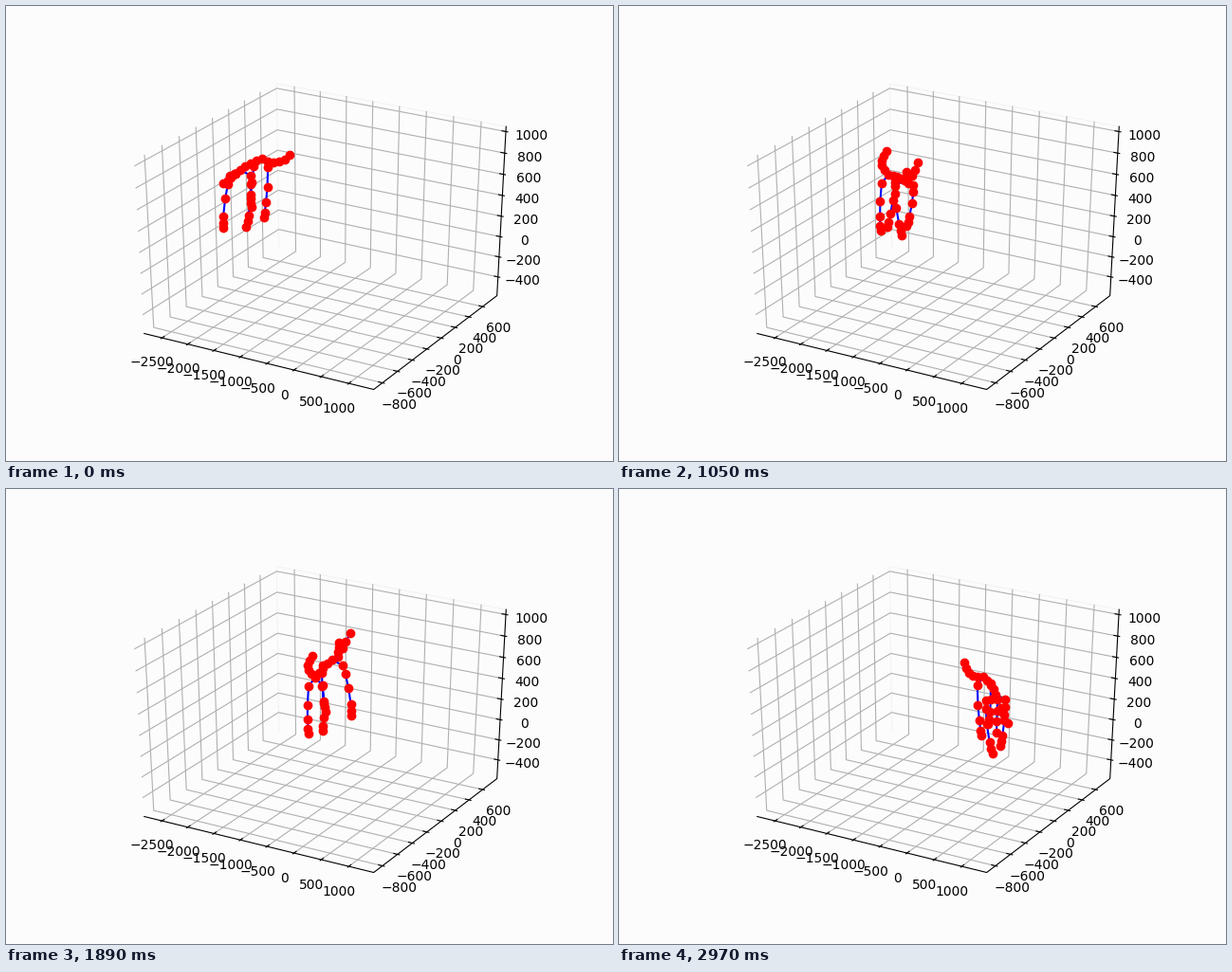
Animation of 640 by 480 pixels, one loop 3000 ms. Source, as a matplotlib script:

```python
import numpy as np
import matplotlib.pyplot as plt
from matplotlib.animation import FuncAnimation

W, H, DPI = 640, 480, 100
FRAMES, STEP = 100, 30
PAPER, GRID = "#fcfcfc", "#b0b0b0"

# 3D box: data centre and span, edge of the padded unit cube
MID = (-699, -49, 228)
SPAN = (4122, 1660, 1570)
EDGE = 25 / 48
PAD = 0.0738
TICKS = (range(-2500, 1001, 500), range(-800, 601, 200), range(-400, 1001, 200))

ELEV, AZIM, DIST = np.radians(30), np.radians(-60), 10
CE, SE, CA, SA = np.cos(ELEV), np.sin(ELEV), np.cos(AZIM), np.sin(AZIM)
VIEW = np.array([[-SA, CA, 0], [-SE * CA, -SE * SA, CE], [CE * CA, CE * SA, SE]])

fig = plt.figure(figsize=(W / DPI, H / DPI), dpi=DPI, facecolor=PAPER)
ax = fig.add_axes([0, 0, 1, 1])
ax.set(xlim=(0, W), ylim=(H, 0))
ax.axis("off")


def project(points):
    """Cube coordinates to stage pixels, in perspective."""
    u, v, w = VIEW @ np.atleast_2d(points).astype(float).T
    depth = DIST - w
    return 334.7 + 2681.1 * u / depth, 237.4 - 1997.8 * v / depth


def stroke(points, color, z=1):
    ax.plot(*project(points), color=color, lw=0.8, zorder=z)


def draw_box():
    e, far = EDGE, EDGE + PAD
    out, inner = e + 1 / 120, e - 1 / 60
    stroke([(-e, e, -e), (-e, e, e), (e, e, e)], "#f3f3f3", z=0)
    rails = (
        lambda t: [(t, -e, -e), (t, e, -e), (t, e, e)],
        lambda t: [(e, t, -e), (-e, t, -e), (-e, t, e)],
        lambda t: [(e, e, t), (-e, e, t), (-e, -e, t)],
    )
    marks = (
        lambda t: [(t, -out, -e), (t, -inner, -e)],
        lambda t: [(out, t, -e), (inner, t, -e)],
        lambda t: [(out, e, t), (inner, e, t)],
    )
    spots = (
        lambda t: (t, -far, -far),
        lambda t: (far, t, -far),
        lambda t: (far, far, t),
    )
    for i in range(3):
        for value in TICKS[i]:
            t = (value - MID[i]) / SPAN[i]
            stroke(rails[i](t), GRID)
            stroke(marks[i](t), "black", z=2)
            (x,), (y,) = project(spots[i](t))
            ax.text(x, y, str(value).replace("-", "\u2212"), fontsize=10,
                    family="DejaVu Sans", ha="center", va="top")
    stroke([(-e, -e, -e), (e, -e, -e), (e, e, -e), (e, e, e)], "black", z=2)


# The body follows four guide points; everything else hangs from them
TIMES = np.array([0, 630, 1050, 1650, 1890, 2340, 2970.0])
GUIDES = np.array([
    [(299, 157), (275, 143), (282, 153), (307, 154), (323, 176), (328, 153), (364, 183)],
    [(270, 161), (269, 178), (284, 178), (312, 184), (326, 199), (354, 170), (384, 198)],
    [(242, 177), (279, 182), (305, 187), (338, 191), (350, 177), (378, 197), (399, 222)],
    [(235, 182), (280, 174), (309, 170), (346, 171), (357, 157), (389, 210), (404, 252)],
], float)
SLOPES = 0.7 * np.gradient(GUIDES, TIMES, axis=1)

GAIT = 1710
HIND = np.array([0.15, 0.48, 0.74, 0.91, 1])
FORE = np.array([0.1, 0.25, 0.5, 0.8, 0.91, 1])
EAR = np.array([0.35, 0.65, 1])
SPLAY = np.array([6, -5])
# joint fractions, trunk joint, hip shift, foot: rest, cosine and sine swing
LEGS = (
    (HIND, 5, -6, (-8, 59), (-9, -5), (0, 0)),
    (HIND, 5, 7, (3, 56), (-8, 8), (-4, -1)),
    (FORE, 9, -10, (-5, 56), (0, -8), (2, 2)),
    (FORE, 9, 9, (11, 53), (-1, -7), (-9, -5)),
)


def guide_points(t):
    """Cubic Hermite blend between neighbouring guide positions."""
    i = min(np.searchsorted(TIMES, t, side="right") - 1, len(TIMES) - 2)
    d = TIMES[i + 1] - TIMES[i]
    s = (t - TIMES[i]) / d
    rise = s * s * (3 - 2 * s)
    bend = (1 - s) * SLOPES[:, i] - s * SLOPES[:, i + 1]
    return GUIDES[:, i] * (1 - rise) + GUIDES[:, i + 1] * rise + d * s * (1 - s) * bend


def arc(a, b, f, bow):
    """Points at fractions f from a to b, bowed sideways."""
    f = np.asarray(f)[:, None]
    dx, dy = (b - a) / np.hypot(*(b - a))
    return a + (b - a) * f + bow * 4 * f * (1 - f) * np.array([-dy, dx])


def leg(root, turn, theta, f, shift, rest, cos, sin):
    reach, drop = (np.array(rest) + np.array(cos) * np.cos(theta)
                   + np.array(sin) * np.sin(theta))
    joints = root + np.outer(f, (reach * turn, drop))
    joints[:, 0] += shift * turn * (1 - f ** 2)
    return joints


def skeleton(t):
    """Trunk polyline, and limbs with the trunk joint each one hangs from."""
    tip, rump, neck, head = guide_points(t)
    turn = np.clip((neck[0] - rump[0]) / 15, -1, 1)
    theta = 2 * np.pi * (t - 630) / GAIT
    trunk = np.vstack([arc(tip, rump, np.linspace(0, 1, 6), 6 * turn),
                       arc(rump, neck, np.linspace(0.2, 1, 5), -2 * turn)])
    limbs = [(10, arc(neck, head + k * SPLAY * turn, EAR, 0)) for k in (-1, 1)]
    for f, joint, *swing in LEGS:
        limbs.append((joint, leg(trunk[joint], turn, theta, f, *swing)))
    return trunk, limbs


draw_box()
bones, = ax.plot([], [], color="blue", lw=1.5, zorder=4)
joints, = ax.plot([], [], "o", color="red", ms=6, zorder=5)
GAP = np.full((1, 2), np.nan)


def update(n):
    trunk, limbs = skeleton(n * STEP)
    lines = [trunk]
    for joint, limb in limbs:
        lines += [GAP, trunk[joint:joint + 1], limb]
    bones.set_data(*np.vstack(lines).T)
    joints.set_data(*np.vstack([trunk] + [limb for _, limb in limbs]).T)
    return bones, joints


anim = FuncAnimation(fig, update, frames=FRAMES, interval=STEP,
                     repeat=True, repeat_delay=0)
plt.show()
```
